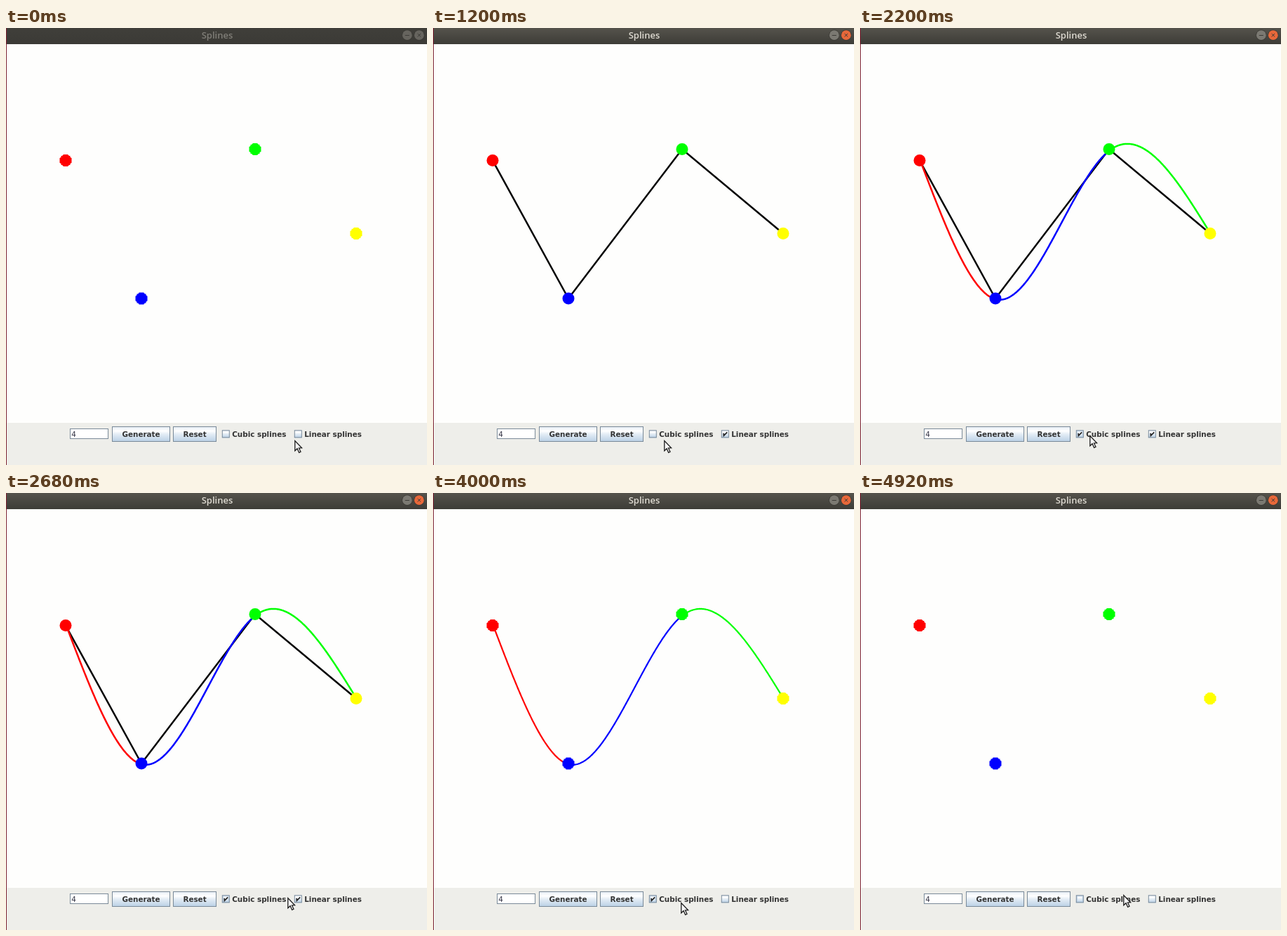
Write an HTML page with a canvas that moves like this. It is 600 px wide and 622 px high and loops after 5000 ms.

```html
<!DOCTYPE html>
<html lang="en">
<head>
<meta charset="utf-8">
<title>Splines</title>
<style>
  html, body { margin: 0; width: 100%; height: 100%; overflow: hidden; background: #fefefd; }
  canvas { display: block; width: 600px; height: 622px; }
</style>
</head>
<body>
<canvas id="stage" width="600" height="622"></canvas>
<script>
const ctx = document.getElementById('stage').getContext('2d');
const LOOP = 5000, STEP = 40;
const UI_FONT = 'bold 10.4px "DejaVu Sans", sans-serif';
const EDGE = '#7a8a99';
// The curve is plotted with dots hung from their top-left corner
const BRUSH_OFFSET = 1.3;

const points = [
  { x: 85, y: 188.6, color: '#ff0000' },
  { x: 193, y: 385, color: '#0000ff' },
  { x: 355, y: 172.5, color: '#00ff00' },
  { x: 499, y: 292.5, color: '#ffff00' }
];

// Pointer path: time, x, y
const path = [
  [0, 411, 587], [40, 411, 587], [80, 411, 585], [120, 412, 582],
  [280, 412, 582], [480, 412, 583], [600, 413, 584], [800, 411, 585],
  [880, 405, 588], [1000, 378, 592], [1200, 329, 587], [1400, 314, 580],
  [2160, 314, 580], [2200, 327, 580], [2720, 407, 576], [2880, 421, 576],
  [3640, 421, 576], [3800, 403, 579], [4000, 353, 583], [4320, 313, 580],
  [4840, 313, 580], [4880, 345, 576], [4920, 375, 572], [5000, 375, 572]
];

const between = (t, from, to) => t >= from && t < to;

function pointerAt(t) {
  const i = path.findIndex(key => key[0] > t);
  const [t0, x0, y0] = path[i - 1], [t1, x1, y1] = path[i];
  const k = (t - t0) / (t1 - t0);
  return { x: Math.round(x0 + (x1 - x0) * k), y: Math.round(y0 + (y1 - y0) * k) };
}

// Second derivatives at the knots of a natural cubic spline
function solveBends() {
  const h = [], slope = [];
  for (let i = 0; i < 3; i++) {
    h[i] = points[i + 1].x - points[i].x;
    slope[i] = (points[i + 1].y - points[i].y) / h[i];
  }
  const a = 2 * (h[0] + h[1]), b = h[1], d = 2 * (h[1] + h[2]);
  const r1 = 6 * (slope[1] - slope[0]), r2 = 6 * (slope[2] - slope[1]);
  const det = a * d - b * b;
  return [0, (r1 * d - b * r2) / det, (a * r2 - b * r1) / det, 0];
}
const bends = solveBends();

function splineY(i, x) {
  const p = points[i], q = points[i + 1], h = q.x - p.x;
  const u = (q.x - x) / h, v = (x - p.x) / h;
  return u * p.y + v * q.y +
    ((u ** 3 - u) * bends[i] + (v ** 3 - v) * bends[i + 1]) * h * h / 6;
}

function rect(x, y, w, h, fill) {
  ctx.fillStyle = fill;
  ctx.fillRect(x, y, w, h);
}

function frame(x, y, w, h, color) {
  ctx.strokeStyle = color;
  ctx.lineWidth = 1;
  ctx.strokeRect(x + 0.5, y + 0.5, w - 1, h - 1);
}

function text(str, x, y, font, color, align = 'left') {
  ctx.font = font;
  ctx.fillStyle = color;
  ctx.textAlign = align;
  ctx.fillText(str, x, y);
}

function gradient(y, h, ...stops) {
  const g = ctx.createLinearGradient(0, y, 0, y + h);
  for (const [at, color] of stops) g.addColorStop(at, color);
  return g;
}

const oceanFill = (y, h) => gradient(y, h,
  [0, '#e4ecf4'], [0.3, '#ffffff'], [0.5, '#e4edf5'], [1, '#b8cfe5']);

function drawCircle(x, y, r, color) {
  ctx.fillStyle = color;
  ctx.beginPath();
  ctx.arc(x, y, r, 0, Math.PI * 2);
  ctx.fill();
}

function drawTitleButton(x, color, cross) {
  const y = 10.2;
  drawCircle(x, y, 7.6, '#3a3934');
  drawCircle(x, y, 6.9, color);
  ctx.strokeStyle = '#3c3b37';
  ctx.lineWidth = 1;
  ctx.beginPath();
  if (cross) {
    ctx.moveTo(x - 2.2, y - 2.2); ctx.lineTo(x + 2.2, y + 2.2);
    ctx.moveTo(x + 2.2, y - 2.2); ctx.lineTo(x - 2.2, y + 2.2);
  } else {
    ctx.moveTo(x - 3, y + 0.3); ctx.lineTo(x + 3, y + 0.3);
  }
  ctx.stroke();
}

function drawTitleBar(active) {
  rect(0, 0, 600, 23, active
    ? gradient(0, 23, [0, '#55534c'], [1, '#3d3c37'])
    : gradient(0, 23, [0, '#403f3a'], [1, '#3b3a36']));
  text('Splines', 301, 14.5, '600 13px "Open Sans", sans-serif',
    active ? '#dfdbd2' : '#807e78', 'center');
  drawTitleButton(571.8, active ? '#7b7972' : '#66645e', false);
  drawTitleButton(588.8, active ? '#e8683a' : '#66645e', true);
}

function drawButton(label, x, w) {
  rect(x, 567, w, 22, oceanFill(567, 22));
  frame(x, 567, w, 22, EDGE);
  text(label, x + w / 2, 581.5, UI_FONT, '#333333', 'center');
}

function drawCheckbox(label, x, { checked, pressed, hover }) {
  const y = 572.3;
  rect(x, y, 11, 11, pressed ? '#a9c0d6' : oceanFill(y, 11));
  if (hover && !pressed) frame(x + 1, y + 1, 9, 9, '#b8cfe5');
  frame(x, y, 11, 11, EDGE);
  if (checked) {
    ctx.strokeStyle = '#222222';
    ctx.lineWidth = 1.7;
    ctx.beginPath();
    ctx.moveTo(x + 3.4, y + 4.5);
    ctx.lineTo(x + 3.6, y + 8);
    ctx.lineTo(x + 8.4, y + 3);
    ctx.stroke();
  }
  text(label, x + 14.4, 581.5, UI_FONT, '#333333');
}

function drawControls(state) {
  rect(0, 562, 600, 60, '#eeeeea');
  rect(91, 570, 55, 15, '#ffffff');
  frame(91, 570, 55, 15, EDGE);
  text('4', 93.3, 581.5, '10.4px "DejaVu Sans", sans-serif', '#333344');
  drawButton('Generate', 151, 83);
  drawButton('Reset', 238, 62);
  drawCheckbox('Cubic splines', 307.8, state.cubic);
  drawCheckbox('Linear splines', 410.8, state.linear);
}

function drawLinear() {
  ctx.strokeStyle = '#000000';
  ctx.lineWidth = 2.5;
  ctx.beginPath();
  for (const p of points) ctx.lineTo(p.x, p.y);
  ctx.stroke();
}

function drawCubic(width) {
  ctx.lineWidth = width;
  for (let i = 0; i < 3; i++) {
    ctx.strokeStyle = points[i].color;
    ctx.beginPath();
    for (let x = points[i].x; x <= points[i + 1].x; x++) {
      ctx.lineTo(x + BRUSH_OFFSET, splineY(i, x) + BRUSH_OFFSET);
    }
    ctx.stroke();
  }
}

function drawDot({ x, y, color }, smooth) {
  if (smooth) return drawCircle(x, y, 8.5, color);
  // Stepped disc built from pixel rows
  ctx.fillStyle = color;
  ctx.beginPath();
  for (let row = -8; row <= 8; row++) {
    const half = Math.round(Math.sqrt(8.6 ** 2 - row ** 2) - 0.5) + 0.5;
    ctx.rect(x - half, y + row - 0.5, half * 2, 1);
  }
  ctx.fill();
}

function drawPointer({ x, y }) {
  const outline = [[0, 0], [0, 14.2], [3.3, 11.2], [5.9, 16.9], [8.2, 15.8], [5.7, 10.4], [9.8, 10.2]];
  ctx.beginPath();
  for (const [dx, dy] of outline) ctx.lineTo(x + 0.8 + dx, y + 0.5 + dy);
  ctx.closePath();
  ctx.fillStyle = '#f8f8f8';
  ctx.fill();
  ctx.strokeStyle = '#1c1c1c';
  ctx.lineWidth = 1.3;
  ctx.stroke();
}

function render(t) {
  const pointer = pointerAt(t);
  const over = (left, right) =>
    between(pointer.x, left, right) && between(pointer.y, 568, 586);
  const linear = {
    checked: between(t, 360, 3400),
    pressed: between(t, 280, 360) || between(t, 3320, 3400),
    hover: over(408, 509)
  };
  const cubic = {
    checked: between(t, 1560, 4600),
    pressed: between(t, 1480, 1560) || between(t, 4520, 4600),
    hover: over(305, 403)
  };

  rect(0, 0, 600, 622, '#fefefd');
  if (linear.checked) drawLinear();
  if (cubic.checked) drawCubic(linear.checked ? 2.5 : 2.2);
  for (const p of points) drawDot(p, linear.checked);
  drawControls({ linear, cubic });
  drawTitleBar(t >= 280);
  rect(0, 0, 1, 622, '#7d2333');
  drawPointer(pointer);
}

const start = performance.now();
function tick() {
  const elapsed = (performance.now() - start) % LOOP;
  render(Math.floor(elapsed / STEP) * STEP);
  requestAnimationFrame(tick);
}
tick();
</script>
</body>
</html>
```
